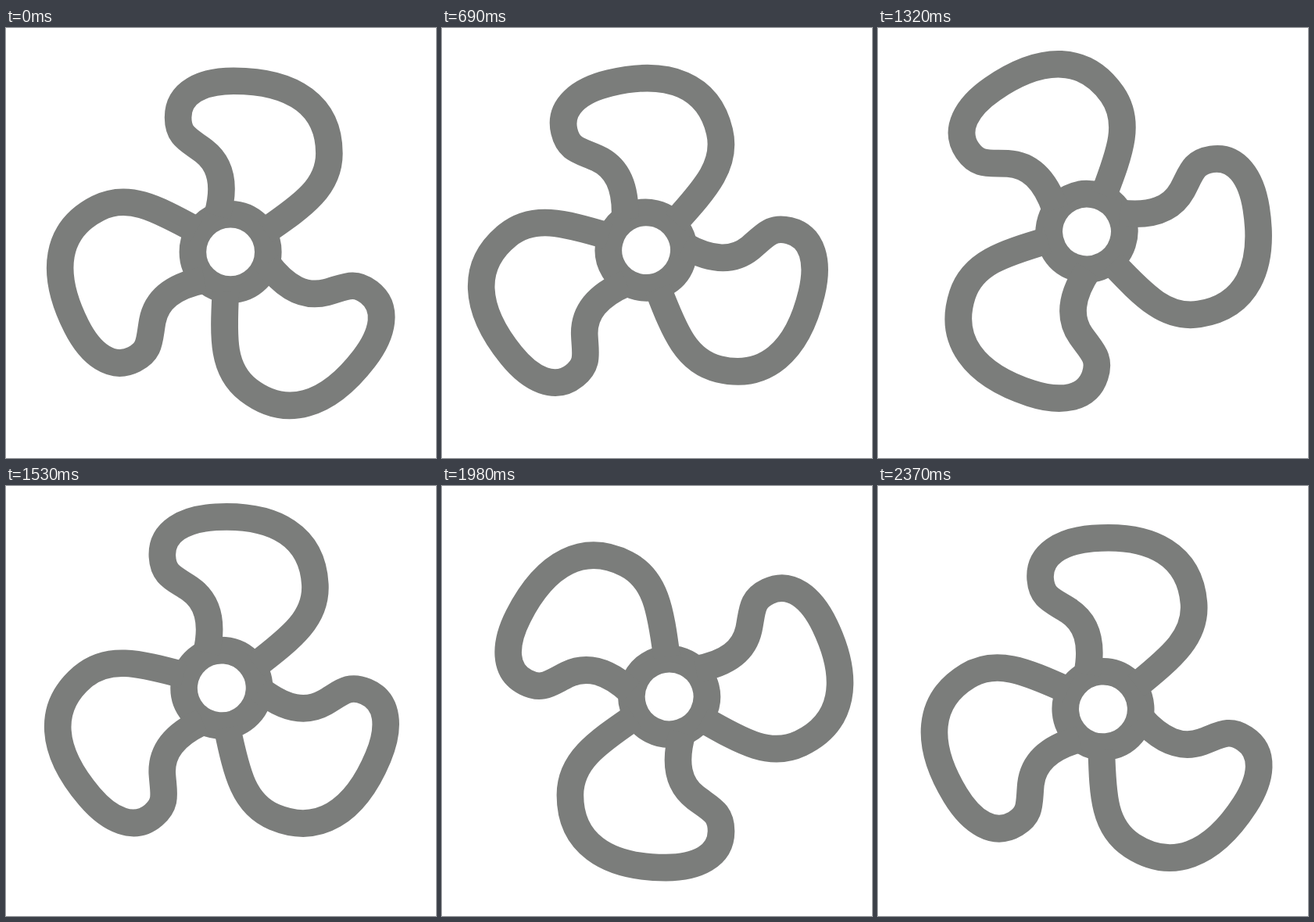
An HTML page that plays this animation: 550 px wide and 550 px high, repeating every 2.4 s.

```html
<!DOCTYPE html>
<html lang="en">
<head>
<meta charset="utf-8">
<title>Propeller</title>
<style>
  html, body { margin: 0; width: 100%; height: 100%; overflow: hidden; background: #fff; }
  svg { display: block; width: 100%; height: 100%; }
</style>
</head>
<body>
<svg viewBox="0 0 550 550">
  <defs>
    <path id="blade" d="M-17,-46 C-6,-85 -12,-112 -34,-129 C-54,-144 -67,-148 -67,-172
      C-67,-204 -36,-218.7 4,-218.7 C82,-218.7 126.3,-186 126.3,-126 C126.3,-84 95,-61 44,-26"/>
  </defs>
  <g id="fan" fill="none" stroke="#7b7d7b" stroke-width="34.6">
    <g transform="translate(287.1 286.4)">
      <circle r="48.2"/>
      <use href="#blade"/>
      <use href="#blade" transform="rotate(127.5)"/>
      <use href="#blade" transform="rotate(243.2)"/>
    </g>
  </g>
</svg>
<script>
  const LOOP = 2400, STEP = 30;
  const fan = document.getElementById('fan');
  const start = performance.now();

  function draw(ms) {
    const t = Math.floor((ms % LOOP) / STEP) * STEP;
    fan.setAttribute('transform', `rotate(${t / LOOP * 360} 275 275)`);
  }

  function tick() {
    draw(performance.now() - start);
    requestAnimationFrame(tick);
  }

  draw(0);
  requestAnimationFrame(tick);
</script>
</body>
</html>
```
